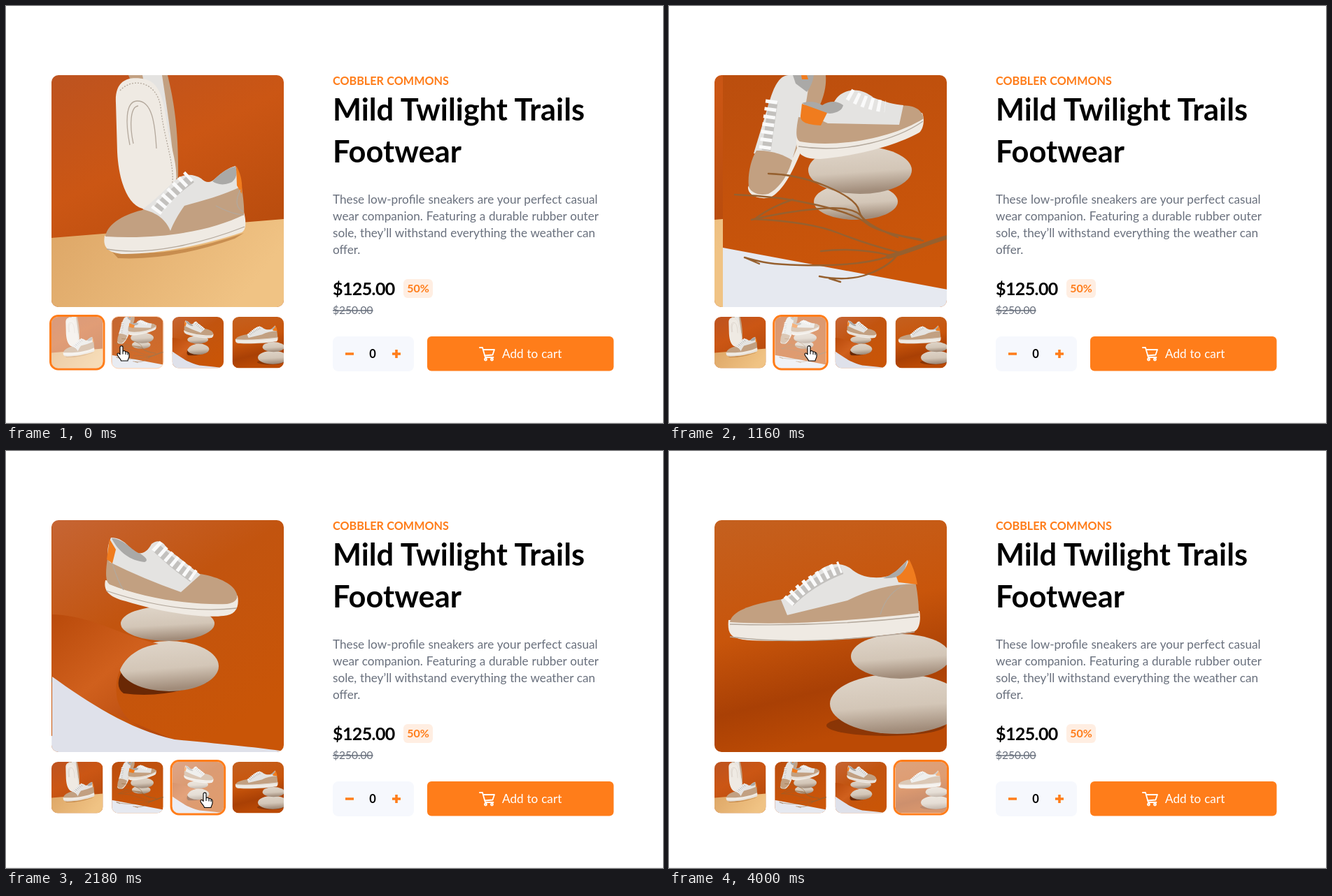
Write an HTML page that moves like this. It is 939 px wide and 597 px high and loops after 4070 ms.

```html
<!DOCTYPE html>
<html lang="en">
<head>
<meta charset="utf-8">
<title>Product gallery</title>
<style>
  html, body { margin: 0; width: 100%; height: 100%; overflow: hidden; background: #fff; }
  svg { display: block; }
  text { font-family: Lato, "Open Sans", sans-serif; font-size: 17.2px; word-spacing: .4px; }
  .bold { font-weight: 700; }
  .title { font-size: 43.4px; }
  .grey { fill: #69707d; }
  .orange { fill: #ff7d1a; }
  .sole { fill: #efeae3; }
  .suede { fill: #c2a081; }
  .leather { fill: #e4e3e1; }
  .heel { fill: #f07c1e; }
  .stone { fill: url(#stone); }
  .lace { fill: none; stroke: #fafafa; stroke-width: 17; stroke-dasharray: 5 6; }
  .gap { fill: none; stroke: #c3c1be; stroke-width: 13; }
  .seam { fill: none; stroke: #b3a89c; stroke-width: 1.3; }
  .inside { fill: #aaa9a7; }
  .twig { fill: none; stroke: #96602f; stroke-width: 2.4; stroke-linecap: round; }
  .stem { stroke-width: 6; }
  .icon { fill: none; stroke: #fff; stroke-width: 1.8; stroke-linecap: round; stroke-linejoin: round; }
  .pointer { fill: #fff; stroke: #000; stroke-width: 1.1; stroke-linejoin: round; }
</style>
</head>
<body>
<svg width="939" height="597" viewBox="0 0 939 597">
  <defs>
    <linearGradient id="wall" x2=".5" y2="1">
      <stop stop-color="#bd5320"/><stop offset=".45" stop-color="#cb5614"/><stop offset="1" stop-color="#b54a0c"/>
    </linearGradient>
    <linearGradient id="floor" x2=".3" y2="1">
      <stop stop-color="#bb4e0e"/><stop offset=".5" stop-color="#c4520c"/><stop offset="1" stop-color="#cb5609"/>
    </linearGradient>
    <linearGradient id="paper" x2=".6" y2="1">
      <stop stop-color="#c66534"/><stop offset=".45" stop-color="#c2540f"/><stop offset="1" stop-color="#c95507"/>
    </linearGradient>
    <linearGradient id="dusk" x2=".25" y2="1">
      <stop stop-color="#c4601f"/><stop offset=".5" stop-color="#c8550b"/><stop offset=".8" stop-color="#a94005"/><stop offset="1" stop-color="#bb4a05"/>
    </linearGradient>
    <linearGradient id="table" x2="1" y2=".3">
      <stop stop-color="#dda666"/><stop offset="1" stop-color="#f0c384"/>
    </linearGradient>
    <linearGradient id="curl" x2=".8" y2="1">
      <stop stop-color="#b94a0b"/><stop offset=".5" stop-color="#d0601d"/><stop offset="1" stop-color="#b4480c"/>
    </linearGradient>
    <linearGradient id="stone" x2=".15" y2="1">
      <stop stop-color="#e0d6ca"/><stop offset=".6" stop-color="#d3c6b7"/><stop offset="1" stop-color="#a18c7a"/>
    </linearGradient>
    <clipPath id="frame"><rect x="65" y="99" width="332" height="332" rx="10"/></clipPath>
    <clipPath id="round"><rect width="332" height="332" rx="42"/></clipPath>

    <symbol id="photo0" viewBox="0 0 332 332">
      <rect width="332" height="332" fill="url(#wall)"/>
      <path fill="url(#table)" d="M0 233L332 206V332H0Z"/>
      <path class="suede" d="M110 0H166C173 30 182 70 181 150L160 130Z"/>
      <path class="leather" d="M130 0H158C164 40 172 90 176 140L155 120Z"/>
      <path class="sole" d="M92 40C90 5 112 1 135 6C156 12 161 40 165 70C169 100 181 125 178 155C175 180 150 192 130 191C108 185 96 150 94 110Z"/>
      <path class="seam" stroke-dasharray="2 2" d="M98 22C115 3 150 8 156 45C160 90 178 130 172 160"/>
      <path class="seam" d="M112 100C106 70 105 38 122 37C144 36 148 70 150 105M117 98C111 70 113 45 124 44"/>
      <path fill="#a86526" opacity=".5" d="M84 250Q160 266 275 226L262 234Q170 266 95 262Z"/>
      <path class="sole" d="M76 230C73 246 80 254 100 256C150 257 220 243 272 225C279 221 278 207 275 196L90 226Z"/>
      <path class="seam" d="M79 249C140 260 220 239 276 217"/>
      <path class="suede" d="M77 231C80 212 105 198 135 192L271 153C274 175 276 190 275 200C230 222 160 236 77 231Z"/>
      <path class="leather" d="M130 192C150 178 165 160 180 148C190 140 205 142 214 148Q224 158 234 148C244 139 252 133 263 130L270 160C245 172 215 180 190 187C182 198 174 212 170 223C164 208 152 197 130 192Z"/>
      <path class="inside" d="M230 152C240 142 250 133 263 131Q268 144 258 153C246 159 236 156 230 152Z"/>
      <path class="heel" d="M264 130C272 143 273 157 272 170L265 158Z"/>
      <path class="gap" d="M151 193Q165 174 200 148"/>
      <path class="lace" d="M149 195Q163 176 197 144"/>
      <path class="seam" d="M235 187Q260 200 275 200M270 164Q258 188 275 196"/>
    </symbol>

    <symbol id="photo1" viewBox="0 0 332 332">
      <rect width="332" height="332" fill="url(#floor)"/>
      <path fill="#e6e9f0" d="M0 247L332 309V332H0Z"/>
      <path class="sole" d="M36 160C35 172 52 179 68 175C88 164 102 135 118 93L90 70Z"/>
      <path class="suede" d="M108 0H147C149 25 138 50 118 78L100 118L92 80Z"/>
      <path class="leather" d="M44 112L68 33C74 14 82 0 94 0H124C122 30 112 80 98 124Z"/>
      <path class="inside" d="M100 0H130Q128 14 120 24L104 12Z"/>
      <path class="suede" d="M37 160C35 143 40 120 48 108C68 107 88 114 99 122C92 146 80 162 65 170C52 173 41 169 37 160Z"/>
      <path class="heel" d="M112 0H120L122 6H113Z"/>
      <path class="gap" d="M62 108L72 38"/>
      <path class="lace" d="M60 106L70 34"/>
      <ellipse class="stone" cx="190" cy="181" rx="60" ry="26"/>
      <ellipse class="stone" cx="196" cy="136" rx="74" ry="34"/>
      <path class="sole" d="M105 90C104 110 110 121 140 120C190 116 250 100 281 82C288 74 288 62 285 54Z"/>
      <path class="seam" d="M108 102C180 113 250 91 286 66"/>
      <path class="suede" d="M108 60C104 80 104 92 110 95C160 104 240 92 287 62C284 46 268 42 250 44L150 66Z"/>
      <path class="leather" d="M112 40C125 36 135 55 150 52C160 40 160 30 175 24C190 18 205 24 215 32C230 38 245 42 258 43L252 71L150 69L110 50Z"/>
      <path class="inside" d="M113 40Q128 35 142 43Q158 33 172 43Q170 53 153 55L133 52Z"/>
      <path class="heel" d="M113 41L149 54L140 72C122 71 110 68 111 58Z"/>
      <path class="lace" d="M180 27Q205 42 232 45"/>
      <path class="twig stem" d="M332 229C295 238 275 250 236 260"/>
      <path class="twig" d="M236 260C200 272 150 273 110 272S55 268 31 261M17 171Q80 173 135 186T205 212T282 235M65 141Q108 142 150 160T195 195T250 232M41 207Q90 195 140 191T200 205T286 237M45 206Q125 210 165 226T252 254M138 288Q180 296 210 284T250 256M152 291L168 296M100 178Q70 188 48 204M31 261L52 270M140 252Q190 246 240 258"/>
    </symbol>

    <symbol id="photo2" viewBox="0 0 332 332">
      <rect width="332" height="332" fill="url(#paper)"/>
      <path fill="#541d04" opacity=".8" d="M110 200Q84 235 102 248Q160 256 222 232L190 205Z"/>
      <ellipse class="stone" cx="167" cy="209" rx="71" ry="36"/>
      <path fill="url(#curl)" d="M0 135C60 137 95 165 152 177C98 186 87 225 93 257C102 288 130 306 175 315L0 240Z"/>
      <path fill="#dfe1ea" d="M0 224C50 260 110 300 175 314C240 320 300 326 332 331V332H0Z"/>
      <ellipse class="stone" cx="165" cy="148" rx="67" ry="25"/>
      <path class="sole" d="M76 86C73 100 80 110 105 116C150 130 210 141 245 137C262 136 268 125 265 108Z"/>
      <path class="seam" d="M77 101C140 122 205 133 264 126"/>
      <path class="suede" d="M79 55C76 75 76 88 82 92C130 112 200 122 250 120C262 118 266 112 264 106C260 92 240 82 212 77L186 100Z"/>
      <path class="leather" d="M84 25C78 38 78 52 82 60Q130 84 184 103L212 78C195 65 178 50 165 42C158 28 150 28 142 34C135 48 125 50 115 45C105 30 95 25 84 25Z"/>
      <path class="inside" d="M85 26C104 27 112 43 126 48Q140 57 132 60C112 58 95 46 85 26Z"/>
      <path class="heel" d="M82 27L91 42L86 62L78 56Z"/>
      <path class="gap" d="M148 39Q174 64 201 83"/>
      <path class="lace" d="M148 36Q176 62 203 80"/>
      <path class="seam" d="M86 62Q94 88 102 100"/>
    </symbol>

    <symbol id="photo3" viewBox="0 0 332 332">
      <rect width="332" height="332" fill="url(#dusk)"/>
      <ellipse cx="245" cy="294" rx="85" ry="15" fill="#6d2a07" opacity=".6"/>
      <ellipse class="stone" cx="261" cy="263" rx="96" ry="43"/>
      <ellipse class="stone" cx="266" cy="195" rx="71" ry="32"/>
      <path class="sole" d="M20 143C18 165 25 170 50 172C130 176 230 168 286 159C294 155 295 140 293 130Z"/>
      <path class="seam" d="M22 167Q130 181 286 160M22 149Q160 153 292 138"/>
      <path class="suede" d="M22 146C25 130 50 122 85 115L286 83C290 100 292 120 292 133C200 144 100 151 22 146Z"/>
      <path class="leather" d="M95 114C115 104 130 85 150 72C165 60 185 60 198 72C215 85 240 84 255 78L276 57L287 91C250 92 220 100 190 115L104 136Z"/>
      <path class="inside" d="M241 83Q260 76 276 57L270 77Q260 84 241 83Z"/>
      <path class="heel" d="M278 56C285 69 288 80 290 92L263 89L260 81Q272 76 278 56Z"/>
      <path class="gap" d="M108 118Q138 88 182 71"/>
      <path class="lace" d="M105 117Q135 84 180 67"/>
      <path class="seam" d="M237 135Q247 102 274 92"/>
    </symbol>
  </defs>

  <path d="M0 596.5H939" stroke="#eee"/>
  <g clip-path="url(#frame)"><g id="strip"></g></g>
  <g id="thumbs"></g>

  <text class="bold orange" x="467" y="112.5" style="font-size:16.2px">COBBLER COMMONS</text>
  <text class="bold title" x="467" y="164">Mild Twilight Trails</text>
  <text class="bold title" x="467" y="224">Footwear</text>
  <g class="grey">
    <text x="467" y="282.5">These low-profile sneakers are your perfect casual</text>
    <text x="467" y="306.5">wear companion. Featuring a durable rubber outer</text>
    <text x="467" y="330.5">sole, they’ll withstand everything the weather can</text>
    <text x="467" y="354.5">offer.</text>
    <text x="467" y="441" style="font-size:15.5px;text-decoration:line-through">$250.00</text>
  </g>
  <text class="bold" x="467" y="414" style="font-size:25px;letter-spacing:-.6px">$125.00</text>
  <rect x="568" y="391" width="42" height="27" rx="6" fill="#ffeee2"/>
  <text class="bold orange" x="589" y="410" text-anchor="middle" style="font-size:16px">50%</text>

  <rect x="467" y="473" width="116" height="50" rx="8" fill="#f6f8fd"/>
  <path stroke="#ff7d1a" stroke-width="3.6" d="M485 498h12M552 498h12M558 492v12"/>
  <text class="bold" x="524" y="504" text-anchor="middle" style="font-size:16.5px">0</text>
  <rect class="orange" x="602" y="473" width="266.5" height="49.6" rx="6"/>
  <path class="icon" d="M677 489h4l4 14h11.5M681.8 492H698l-2.5 7.5-11.5 1"/>
  <g class="icon"><circle cx="685.5" cy="506" r="1.5"/><circle cx="694.5" cy="506" r="1.5"/></g>
  <text x="709" y="504" fill="#fff">Add to cart</text>

  <g id="cursor" class="pointer">
    <path id="hand" d="M-2 2C-2-.5 2-.5 2 2V8C3 6.5 6 7 6 9C7 8 9 8.5 9 10C10 9.5 11 10 11 12V15C11 18 9 19 9 21.5H-.5C-.5 19-6 15-6 12C-6 10-3.5 10-2 12.5ZM2 8v4M6 9v3.5M9 10v3"/>
    <path id="arrow" d="M0 0V16L4 12.5L6.3 18L8.8 17L6.5 11.7H11.5Z"/>
  </g>
</svg>
<script>
const LOOP = 4070, SIZE = 332, THUMB = 73.5, TOP = 445;
const thumbX = [65, 151.2, 237.6, 323.5];
const slides = [[675, 550], [1700, 500], [3011, 597]];              // start, duration
const lit = [[-999, 675], [-80, 1700], [1420, 3011], [2235, 9999]]; // highlight on, off
const path = [ // time, x, y of the pointer tip
  [0, 165, 486.5], [420, 200, 486.5], [1230, 200, 486.5], [1560, 258, 490], [1760, 258, 490],
  [2090, 284, 489], [2180, 284, 489], [2260, 330, 488], [2600, 347, 488], [3400, 347, 488],
  [3870, 649, 575], [3930, 729, 589], [4000, 780, 620], [LOOP, 780, 620]
];
const $ = id => document.getElementById(id);
const clamp = v => Math.min(1, Math.max(0, v));
const smooth = v => (v = clamp(v), v * v * (3 - 2 * v));

$('strip').innerHTML = thumbX.map((_, i) =>
  `<use href="#photo${i}" x="${65 + i * SIZE}" y="99" width="${SIZE}" height="${SIZE}"/>`).join('');

$('thumbs').innerHTML = thumbX.map((x, i) => `<g>
  <g transform="translate(${x} ${TOP}) scale(${THUMB / SIZE})" clip-path="url(#round)">
    <use href="#photo${i}" width="${SIZE}" height="${SIZE}"/></g>
  <rect fill="none" stroke="#ff7d1a"/></g>`).join('');
const thumbs = [...$('thumbs').children];

function drawThumb(g, i, t) {
  const [on, off] = lit[i];
  const level = clamp((t - on) / 250) - clamp((t - off) / 200);
  const grow = 1.5 * level, ring = g.lastElementChild;
  g.firstElementChild.setAttribute('opacity', 1 - .42 * level);
  const attrs = {
    x: thumbX[i] - grow, y: TOP - grow, width: THUMB + 2 * grow, height: THUMB + 2 * grow,
    rx: 9.5 + grow, 'stroke-width': 3 * level, opacity: level
  };
  for (const name in attrs) ring.setAttribute(name, attrs[name]);
}

function drawCursor(t) {
  const n = path.findIndex(p => p[0] > t);
  const [t0, x0, y0] = path[n - 1], [t1, x1, y1] = path[n];
  const k = smooth((t - t0) / (t1 - t0));
  const x = x0 + (x1 - x0) * k, y = y0 + (y1 - y0) * k;
  const over = y < 521 && thumbX.some(left => x > left - 3 && x < left + THUMB + 3);
  $('cursor').setAttribute('transform', `translate(${x} ${y})`);
  $('hand').setAttribute('visibility', over ? 'visible' : 'hidden');
  $('arrow').setAttribute('visibility', over ? 'hidden' : 'visible');
}

function draw() {
  const t = performance.now() % LOOP;
  const pos = slides.reduce((sum, [start, time]) => sum + smooth((t - start) / time), 0);
  // Whole pixels keep the joint between two photos closed.
  $('strip').setAttribute('transform', `translate(${-Math.round(SIZE * pos)} 0)`);
  thumbs.forEach((g, i) => drawThumb(g, i, t));
  drawCursor(t);
  requestAnimationFrame(draw);
}
draw();
</script>
</body>
</html>
```
